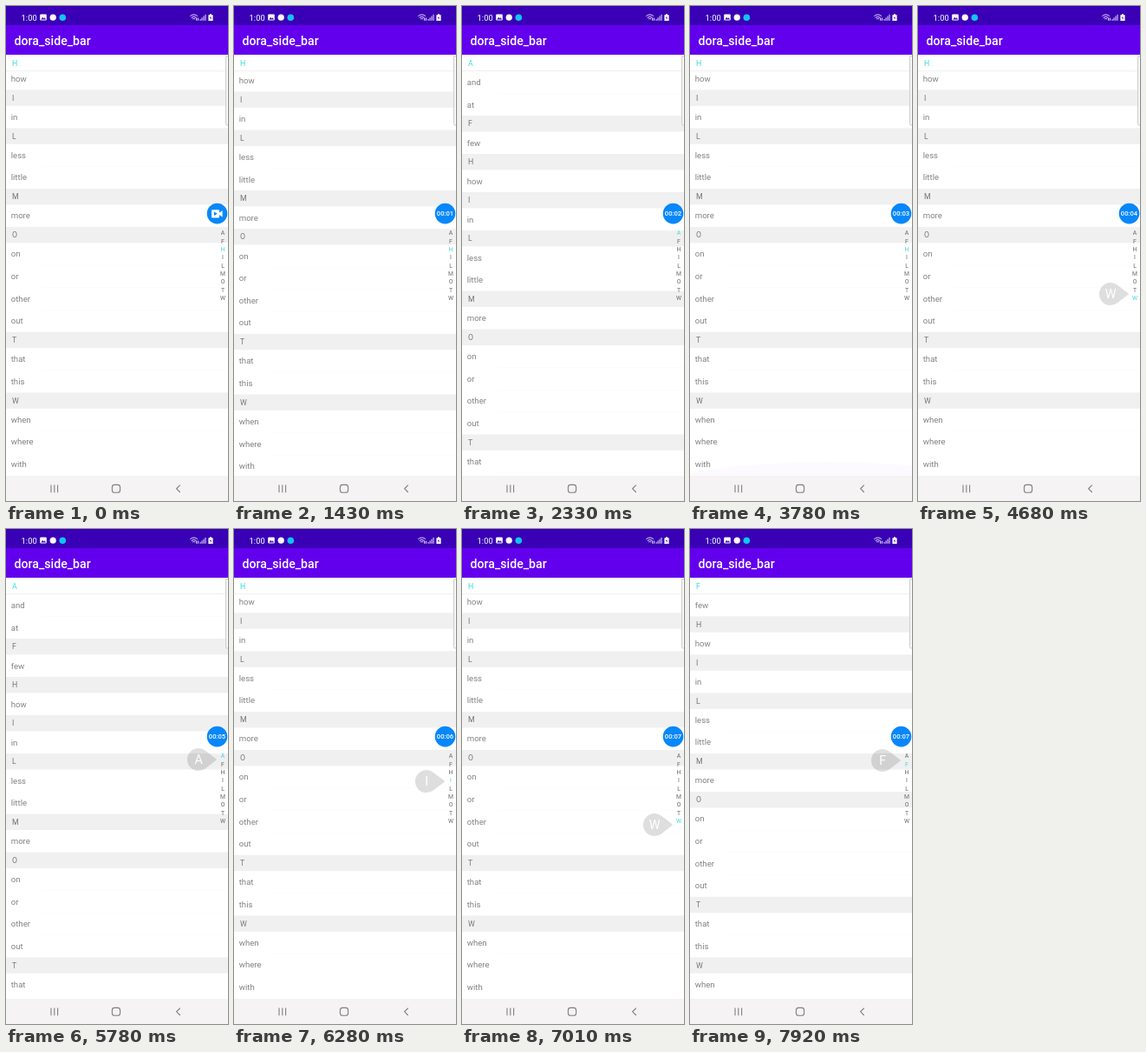
An HTML page that plays this animation: 256x569 px, repeating every 7.99 s.

```html
<!DOCTYPE html>
<html lang="en">
<head>
<meta charset="utf-8">
<title>dora_side_bar</title>
<style>
  html, body { margin: 0; width: 100%; height: 100%; overflow: hidden; background: #fff; }
  svg { display: block; width: 256px; height: 569px; font-family: Roboto, sans-serif; }
  .item { font-size: 9.65px; fill: #828282; }
  .head { font-size: 8.8px; fill: #777; }
  .index { font-size: 6.8px; fill: #666; text-anchor: middle; }
  .head.on, .index.on { fill: #3fd9d9; }
  .white { fill: #fff; }
  .mid { text-anchor: middle; }
  .line { fill: none; stroke: #fff; stroke-width: .9; }
  .nav { fill: none; stroke: #808080; stroke-width: 1.1; }
</style>
</head>
<body>
<svg viewBox="0 0 256 569">
  <rect width="256" height="569" fill="#fff"/>
  <g id="list"></g>
  <ellipse id="glow" cx="160" cy="561" rx="210" ry="37" fill="#6200ee" opacity=".02"/>
  <g id="sticky">
    <rect y="56" width="256" height="18.8" fill="#fff"/>
    <rect y="74.5" width="256" height=".6" fill="#e6e6e6"/>
    <text id="stickyText" class="head on" x="7" y="69"/>
  </g>

  <rect width="256" height="22" fill="#3a00b5"/>
  <rect y="22" width="256" height="34" fill="#6200ee"/>
  <text class="white" x="9.6" y="44.6" font-size="14.1" font-weight="500">dora_side_bar</text>
  <text class="white" x="17.6" y="16.7" font-size="9.4">1:00</text>
  <rect class="white" x="39.2" y="9.6" width="7.6" height="7" rx="1"/>
  <path d="M40.4 15.4l1.8-2.6 1.4 1.6 1-1.2 1.4 2.2z" fill="#3a00b5"/>
  <circle class="white" cx="54.2" cy="13.2" r="3.6"/>
  <circle cx="65.3" cy="13.2" r="3.8" fill="#12c4f4"/>
  <path class="line" d="M212.4 11.6q4.2-3.4 8.4 0M213.8 13.4q2.8-2.2 5.6 0M215.2 15q1.4-1 2.8 0M219.6 13.6v3.2M221.4 13.6v3.2"/>
  <path class="line" d="M224 16.8v-1.8M226 16.8v-3.4M228 16.8v-5.2M230 16.8v-7"/>
  <path class="white" d="M233.4 10.2h1.6v-1h2v1h1.6v6.8h-5.2z"/>
  <path d="M236.6 11.4l-1.8 2.6h1.2l-.6 2 1.8-2.6h-1.2z" fill="#3a00b5"/>

  <rect y="540" width="256" height="29" fill="#f5f3f4"/>
  <path class="nav" d="M52 550.6v8.6M55.8 550.6v8.6M59.6 550.6v8.6M200.8 550.6l-4.2 4.2 4.2 4.2"/>
  <rect class="nav" x="122.4" y="550.4" width="9.2" height="8.8" rx="2.8"/>
  <rect x="253.5" y="57.5" width="5" height="79.5" rx="1.5" fill="#f6f6f6" stroke="#c8c8c8" stroke-width=".9"/>

  <g id="letters"></g>
  <g id="bubble">
    <path d="M230 -10.2A13 13 0 1 0 230 10.2L242.4 .8Q243.4 0 242.4 -.8Z" fill="#000" opacity=".13"/>
    <text id="bubbleText" class="white mid" x="222.2" y="5.3" font-size="14.4"/>
  </g>

  <circle cx="243.5" cy="238.6" r="11.8" fill="#0787fb"/>
  <g id="camera">
    <path class="white" d="M238 234.2h7q1 0 1 1v2.2l3.6-2.2v7.2l-3.6-2.2v2.2q0 1-1 1h-7q-1 0-1-1v-7.2q0-1 1-1z"/>
    <path d="M240 236.6v4.4l3.8-2.2z" fill="#0787fb"/>
  </g>
  <text id="timer" class="white mid" x="243.5" y="241.3" font-size="7.6" font-weight="500"/>
</svg>

<script>
const LOOP = 7990, TOP = 56.4, HEAD = 18.4, ROW = 25.6, MAX_SCROLL = 117.6;
const INDEX_TOP = 256.4, INDEX_STEP = 9.31;
const TOUCH_START = 3980;
const words = 'and at few how in less little more on or other out that this when where with'.split(' ');
const ticks = [930, 1930, 3280, 4420, 5230, 6030, 7010];
const scrollKeys = [[1380, MAX_SCROLL], [2030, 0], [3230, 0], [3430, MAX_SCROLL]];
const fingerKeys = [
  [TOUCH_START, 285.5], [4370, 285.5], [4680, 331], [4830, 339], [4930, 339], [4980, 331],
  [5190, 331], [5780, 265], [5980, 260], [6780, 340], [7390, 340], [7430, 335], [7520, 335], [7920, 266]
];

const el = id => document.getElementById(id);
const linear = u => u;
const smooth = u => u * u * (3 - 2 * u);

function sample(keys, t, ease) {
  const i = keys.findIndex(k => k[0] > t);
  if (i === 0) return keys[0][1];
  if (i < 0) return keys[keys.length - 1][1];
  const [t0, a] = keys[i - 1], [t1, b] = keys[i];
  return a + (b - a) * ease((t - t0) / (t1 - t0));
}

// Sections: one per initial letter, with the scroll offset of its header
const sections = [];
let offset = 0, markup = '', previous = '';
for (const word of words) {
  const letter = word[0].toUpperCase(), y = () => TOP + offset;
  if (letter !== previous) {
    sections.push({ letter, top: offset });
    markup += `<rect y="${y()}" width="256" height="${HEAD}" fill="#f0f0f0"/>
      <text class="head" x="7" y="${y() + 12.4}">${letter}</text>`;
    offset += HEAD;
  } else {
    markup += `<rect x="40" y="${y() - .3}" width="216" height=".6" fill="#fafafa"/>`;
  }
  markup += `<text class="item" x="5.7" y="${y() + 16.1}">${word}</text>`;
  offset += ROW;
  previous = letter;
}
el('list').innerHTML = markup;
el('letters').innerHTML = sections.map((s, i) =>
  `<text class="index" x="250" y="${INDEX_TOP + INDEX_STEP * (i + .5) + 2.3}">${s.letter}</text>`).join('');
const indexTexts = [...el('letters').children];

const show = (id, on) => el(id).setAttribute('visibility', on ? 'visible' : 'hidden');
const shift = (id, y) => el(id).setAttribute('transform', `translate(0 ${y})`);

function draw(t) {
  const touching = t >= TOUCH_START;
  const finger = sample(fingerKeys, t, linear);
  const touched = Math.max(0, Math.min(sections.length - 1, Math.floor((finger - INDEX_TOP) / INDEX_STEP)));
  const scroll = touching ? Math.min(MAX_SCROLL, sections[touched].top) : sample(scrollKeys, t, smooth);
  const current = sections.filter(s => s.top <= scroll + .01).length - 1;
  const active = touching ? touched : current;

  shift('list', -scroll);
  shift('sticky', Math.min(0, sections[current + 1].top - scroll - HEAD));
  el('stickyText').textContent = sections[current].letter;
  indexTexts.forEach((text, i) => text.classList.toggle('on', i === active));

  show('bubble', touching);
  shift('bubble', finger);
  el('bubbleText').textContent = sections[touched].letter;

  show('glow', t >= 3430 && t < 4420);
  show('camera', t < 100);
  show('timer', t >= 100);
  el('timer').textContent = '00:0' + ticks.filter(k => k <= t).length;
}

function frame() {
  draw(performance.now() % LOOP);
  requestAnimationFrame(frame);
}
frame();
</script>
</body>
</html>
```
